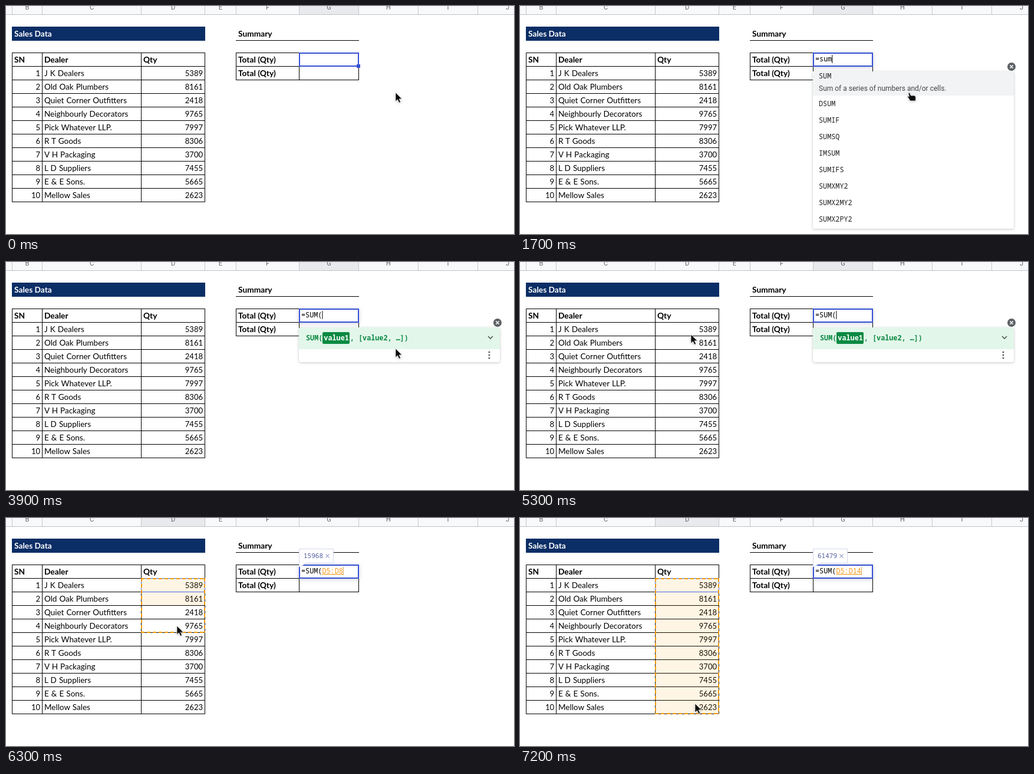
Animation of 862x387 px, one loop 8 s. Source, as an HTML page:

```html
<!DOCTYPE html>
<html lang="en">
<head>
<meta charset="utf-8">
<title>Summing a column</title>
<style>
  html, body { margin: 0; width: 100%; height: 100%; overflow: hidden; background: #fff; }
  svg { display: block; width: 862px; height: 387px; }
  text { white-space: pre; }
  .cell { font: 13.5px Lato, sans-serif; word-spacing: .6px; }
  .num { font: 13px Lato, sans-serif; text-anchor: end; }
  .bold { font-size: 13.75px; font-weight: 700; word-spacing: 0; }
  .mono { font: 11.8px "Noto Sans Mono", "DejaVu Sans Mono", monospace; }
  .head { font: 11px Roboto, sans-serif; fill: #5f6368; text-anchor: middle; }
  .desc { font: 12px Roboto, sans-serif; fill: #444; }
  .grid { stroke: #000; fill: none; shape-rendering: crispEdges; }
  .shade { filter: drop-shadow(0 1px 2px rgba(60, 64, 67, .3)); }
  .edit { filter: drop-shadow(0 1px 3px rgba(60, 64, 110, .3)); }
  .hint { font-weight: 700; fill: #0b8a42; }
</style>
</head>
<body>
<svg id="stage" viewBox="0 0 862 387">
  <g id="header"></g>
  <g id="sheet"></g>
  <g id="range" fill="none">
    <rect id="fill" x="229" y="102" width="109" fill="#f29900" fill-opacity=".1"/>
    <rect x="229.5" y="102.5" width="108" height="23" stroke="#4a63d8"/>
    <path id="ants" stroke="#f29900" stroke-width="2" stroke-dasharray="6 4"/>
  </g>

  <rect id="active" x="498" y="80" width="100" height="22" fill="#fff" stroke="#3450d4" stroke-width="2"/>
  <rect id="handle" x="595" y="99" width="6" height="6" fill="#3450d4"/>
  <text class="mono" x="501" y="94"><tspan id="formula"></tspan><tspan id="ref" fill="#f29a1f" text-decoration="underline"></tspan></text>
  <rect id="caret" y="83" width="1" height="14"/>

  <g id="tip">
    <path d="M497.5 52.5H555.5V76.5H510L497.5 83Z" fill="#fff" stroke="#d3d8ec"/>
    <text id="sum" x="505" y="67.5" class="mono" style="font-size:11px" fill="#4d5b9c"></text>
    <path d="M542.5 61.5l6 6m0-6l-6 6" stroke="#5f6ca8"/>
  </g>

  <g id="list">
    <rect id="listBox" class="shade" x="497" y="111" width="341" rx="3" fill="#fff"/>
    <g id="items"></g>
  </g>

  <g id="help">
    <rect class="shade" x="497" y="111" width="341" height="59" rx="3" fill="#fff"/>
    <path d="M497 148V114q0-3 3-3H835q3 0 3 3V148Z" fill="#e3f6ea"/>
    <rect x="537" y="119" width="46" height="20" rx="2" fill="#0b8a42"/>
    <text class="mono hint" x="509" y="133">SUM(<tspan dx="2" fill="#fff">value1</tspan><tspan dx="2">, [value2, …])</tspan></text>
    <path d="M818 126l4 4 4-4" fill="none" stroke="#4f5b55" stroke-width="1.6"/>
    <g fill="#5f6368"><circle cx="820" cy="153" r="1.6"/><circle cx="820" cy="158" r="1.6"/><circle cx="820" cy="163" r="1.6"/></g>
  </g>

  <g id="close">
    <circle cx="834" cy="103" r="7" fill="#5c6064"/>
    <path d="M831.3 100.3l5.4 5.4m0-5.4l-5.4 5.4" stroke="#fff" stroke-width="1.5"/>
  </g>

  <g id="pointer" class="shade">
    <path id="arrow" d="M0 0V15L3.5 11.8 6 17.3 8.6 16.2 6.2 10.8H11Z" fill="#0b0b0b" stroke="#fff" stroke-width=".7"/>
    <path id="hand" d="M-2 1Q-.8-.8.6 1L2.2 5H8Q10.4 5.4 10.4 8V14H1L-1.6 9.5-3.4 7.2Q-2.6 5.4-.6 6.6Z" fill="#0b0b0b" stroke="#fff" stroke-width=".7"/>
  </g>
</svg>
<script>
const LOOP = 8000, STEP = 100, TOP = 102, ROW = 23;
const $ = id => document.getElementById(id);

const dealers = [
  ["J K Dealers", 5389], ["Old Oak Plumbers", 8161],
  ["Quiet Corner Outfitters", 2418], ["Neighbourly Decorators", 9765],
  ["Pick Whatever LLP.", 7997], ["R T Goods", 8306],
  ["V H Packaging", 3700], ["L D Suppliers", 7455],
  ["E & E Sons.", 5665], ["Mellow Sales", 2623]
];
const lists = {
  s: ["Secant of an angle provided in radians.",
    "SEC SIN SLN SUM SYD ASIN SECH SIGN SINH SKEW"],
  sum: ["Sum of a series of numbers and/or cells.",
    "SUM DSUM SUMIF SUMSQ IMSUM SUMIFS SUMXMY2 SUMX2MY2 SUMX2PY2"]
};

// time, x, y of the pointer tip
const track = [
  [4700, 661, 147], [4800, 655, 147], [4900, 593, 143], [5100, 370, 66],
  [5200, 275, 92], [5300, 290, 123], [6000, 290, 123], [6300, 290, 183],
  [6900, 295, 291], [7000, 297, 311], [7100, 297, 315]
];

function add(parent, tag, attrs, content = "") {
  const el = document.createElementNS("http://www.w3.org/2000/svg", tag);
  for (const key in attrs) el.setAttribute(key, attrs[key]);
  el.textContent = content;
  parent.append(el);
  return el;
}
const write = (parent, cls, x, y, content, extra) =>
  add(parent, "text", { class: cls, x, y, ...extra }, content);
const show = (id, on) => $(id).style.display = on ? "" : "none";

function buildHeader() {
  const g = $("header"), edges = [10, 61, 229, 337, 390, 497, 598, 699, 800, 901];
  add(g, "rect", { width: 862, height: 14, fill: "#f8f9fa" });
  add(g, "rect", { id: "column", y: 0, height: 14, fill: "#e8eaed" });
  edges.forEach(x => add(g, "path", { d: `M${x + .5} 0V14`, stroke: "#c4c6c8" }));
  add(g, "path", { d: "M0 14.5H862", stroke: "#c0c2c4" });
  [..."BCDEFGHIJ"].forEach((letter, i) =>
    write(g, "head", (edges[i] + edges[i + 1]) / 2 + .5, 6, letter));
}

function gridPath(xs, y0, rows) {
  const y1 = y0 + rows * ROW;
  let d = xs.map(x => `M${x + .5} ${y0}V${y1 + 1}`).join("");
  for (let y = y0; y <= y1; y += ROW) d += `M${xs[0]} ${y + .5}H${xs.at(-1) + 1}`;
  return d;
}

function buildSheet() {
  const g = $("sheet");
  add(g, "rect", { x: 10, y: 35, width: 328, height: 24, fill: "#0b2e66" });
  write(g, "cell bold", 14, 52, "Sales Data", { fill: "#fff" });
  write(g, "cell bold", 394, 52, "Summary");
  write(g, "cell bold", 394, 96, "Total (Qty)");
  write(g, "cell bold", 394, 119, "Total (Qty)");
  write(g, "cell bold", 14, 96, "SN");
  write(g, "cell bold", 65, 96, "Dealer");
  write(g, "cell bold", 233, 96, "Qty");
  dealers.forEach(([name, qty], i) => {
    const y = 119 + i * ROW;
    write(g, "num", 58, y, i + 1);
    write(g, "cell", 65, y, name);
    write(g, "num", 334, y, qty);
  });
  add(g, "path", {
    class: "grid",
    d: gridPath([10, 61, 229, 337], 79, 11) + gridPath([390, 497, 598], 79, 2) + "M390 58.5H599"
  });
}

let shownList;
function fillList(key) {
  if (key === shownList) return;
  shownList = key;
  const [desc, names] = lists[key], g = $("items");
  g.replaceChildren();
  add(g, "rect", { x: 497, y: 111, width: 341, height: 41, fill: "#f1f3f4" });
  write(g, "desc", 507, 144, desc);
  names.split(" ").forEach((name, i) =>
    write(g, "mono", 507, i ? 142 + i * 28 : 123, name, { fill: "#202124" }));
  $("listBox").setAttribute("height", names.split(" ").length * 28 + 15);
}

function pointerAt(t) {
  const i = track.findIndex(p => p[0] > t);
  if (i === 0) return track[0].slice(1);
  if (i < 0) return track.at(-1).slice(1);
  const [t0, x0, y0] = track[i - 1], [t1, x1, y1] = track[i];
  const k = (t - t0) / (t1 - t0);
  return [x0 + (x1 - x0) * k, y0 + (y1 - y0) * k];
}

function rowsAt(t) {
  if (t < 5700) return 0;
  const row = Math.floor((pointerAt(t)[1] - TOP - 1) / ROW) + 1;
  return Math.max(1, Math.min(dealers.length, row));
}

function typedAt(t) {
  if (t < 600) return "";
  if (t < 1300) return "=";
  if (t < 1500) return "=s";
  if (t < 1600) return "=su";
  return t < 2300 ? "=sum" : "=SUM(";
}

function caretOn(t) {
  if (t < 600) return false;
  return !(t >= 3300 && t < 3900 || t >= 4400 && t < 4900 || t >= 5400 && t < 5700);
}

function draw(t) {
  const editing = t >= 600, picking = t >= 5700;
  const rows = rowsAt(t);

  $("column").setAttribute("x", picking ? 230 : 498);
  $("column").setAttribute("width", picking ? 107 : 100);
  $("active").setAttribute("class", editing ? "edit" : "");
  show("handle", !editing);

  const typed = typedAt(t);
  const ref = picking ? "D5" + (rows > 1 ? ":D" + (rows + 4) : "") : "";
  $("formula").textContent = typed;
  $("ref").textContent = ref;
  $("caret").setAttribute("x", 501 + (typed + ref).length * 7.08);
  $("caret").setAttribute("fill", picking ? "#d9a04a" : "#000");
  show("caret", caretOn(t));

  // the fill and the total trail behind the dragged outline
  show("range", picking);
  if (picking) {
    const bottom = TOP + rows * ROW;
    $("fill").setAttribute("height", Math.max(1, rowsAt(t - 200)) * ROW);
    $("ants").setAttribute("d",
      `M229 103H338M229 ${bottom}H338M230 102V${bottom + 1}M337 102V${bottom + 1}`);
  }
  show("tip", t >= 6100);
  $("sum").textContent = dealers.slice(0, rowsAt(t - 100)).reduce((sum, d) => sum + d[1], 0);

  const listed = t >= 1300 && t < 2400;
  show("list", listed);
  if (listed) {
    const alpha = t >= 2300 ? .22 : Math.min(1, .22 + (t - 1300) * .0039);
    fillList(t < 1500 ? "s" : "sum");
    $("items").setAttribute("opacity", alpha);
    $("listBox").setAttribute("opacity", alpha < 1 ? .88 : 1);
  }
  const helped = t >= 2900 && t < 5700;
  show("help", helped);
  show("close", t >= 1300 && t < 2300 || helped);

  const hand = t >= 1300 && t < 3300;
  show("hand", hand);
  show("arrow", !hand);
  $("pointer").setAttribute("transform", `translate(${pointerAt(t)})`);
}

function tick(now) {
  draw(Math.floor(now % LOOP / STEP) * STEP);
  requestAnimationFrame(tick);
}

buildHeader();
buildSheet();
draw(0);
requestAnimationFrame(tick);
</script>
</body>
</html>
```
